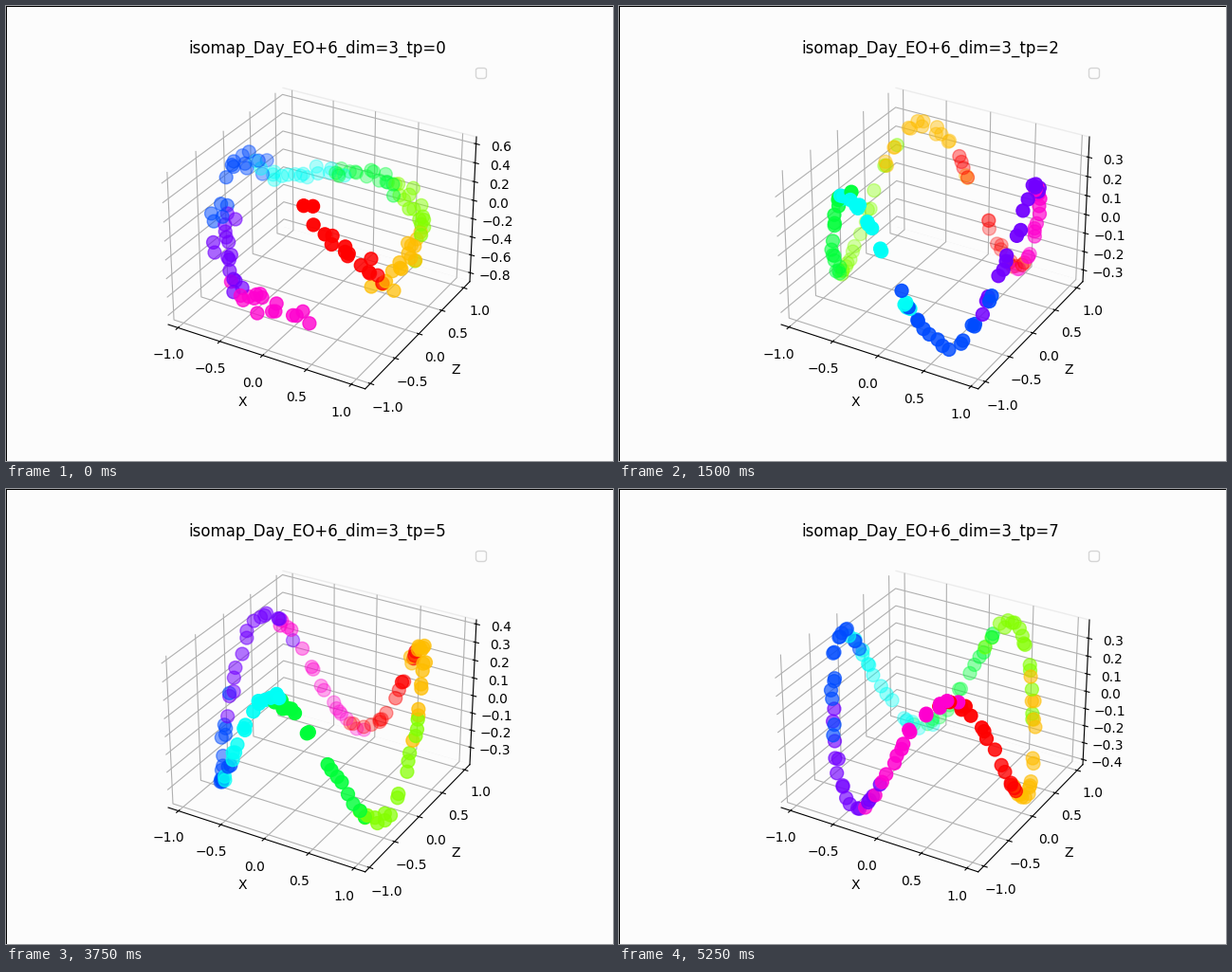
Animation of 640 by 480 pixels, one loop 6000 ms. Source, as a matplotlib script:

```python
from collections import namedtuple

import numpy as np
import matplotlib.pyplot as plt
from matplotlib.animation import FuncAnimation
from matplotlib.patches import Rectangle

W, H = 640, 480
PAPER = "#fcfcfc"
PER_CLASS = 16
HUES = [plt.cm.hsv(i / 8) for i in range(8)]

plt.rcParams["axes.facecolor"] = PAPER

# Angles are in degrees as seen by the viewer: 0 right, 90 front, 180 left.
# first: middle of the red class; turn: the way the classes go round;
# peak: a crest of the three-crested wave on the ring.
Scene = namedtuple("Scene", "xlim ylim zlim first turn peak")
SCENES = [
    Scene((-1.118, 1.153), (-1.101, 1.144), (-.899, .673), 75, -1, None),
    Scene((-1.142, 1.155), (-1.101, 1.148), (-.477, .382), 317, 1, 70),
    Scene((-1.090, 1.077), (-1.142, 1.146), (-.364, .404), 310, -1, 24),
    Scene((-1.118, 1.150), (-1.120, 1.140), (-.400, .420), 325, 1, 10),
    Scene((-1.124, 1.143), (-1.121, 1.145), (-.409, .445), 335, 1, 16),
    Scene((-1.122, 1.121), (-1.081, 1.119), (-.402, .423), 315, 1, -6),
    Scene((-1.110, 1.121), (-1.100, 1.125), (-.415, .410), 60, -1, 83),
    Scene((-1.110, 1.121), (-1.110, 1.132), (-.430, .402), 60, -1, 83),
]


def wave(angle, scene):
    """Three even crests that fill the height of the box."""
    lo, hi = scene.zlim
    crest = np.cos(3 * np.radians(angle - scene.peak))
    return (lo + hi) / 2 + 0.42 * (hi - lo) * crest


def fold(angle, red):
    """Uneven ring of the first scene; its red class rises off as a ramp."""
    keys = [10, 58, 75, 100, 127, 153, 190, 210, 225, 245, 320]
    heights = [-.07, -.27, -.42, -.46, -.4, -.3, .02, .35, .3, 0, .08]
    ring = np.interp(angle, keys, heights, period=360)
    return np.where(red, 0.1 + 0.018 * (angle - 68), ring)


def build(tp):
    """Positions and colours of all dots at one time point."""
    scene = SCENES[tp]
    rng = np.random.default_rng(tp)
    hue = np.repeat(np.arange(8), PER_CLASS)
    spread = np.tile(np.linspace(-25, 25, PER_CLASS), 8)
    angle = scene.first + 45 * scene.turn * hue + spread
    angle = angle + rng.normal(0, 3, hue.size)
    if scene.peak is None:
        height, noise = fold(angle, hue == 0), 0.05
    else:
        height, noise = wave(angle, scene), 0.012
    radius = 1 + rng.normal(0, noise, hue.size)
    height = height + rng.normal(0, noise, hue.size)
    turned = np.radians(angle - 30)
    return (radius * np.cos(turned), -radius * np.sin(turned), height,
            [HUES[k] for k in hue])


def ticks(limits, step):
    """Multiples of step, leaving out the outer 2% of the axis."""
    lo, hi = limits
    pad = 0.02 * (hi - lo)
    first, last = np.ceil((lo + pad) / step), np.floor((hi - pad) / step)
    return np.arange(first, last + 1) * step


clouds = [build(tp) for tp in range(len(SCENES))]

fig = plt.figure(figsize=(W / 100, H / 100), dpi=100, facecolor=PAPER)
ax = fig.add_subplot(projection="3d")
for axis in (ax.xaxis, ax.yaxis, ax.zaxis):
    axis.set_pane_color(PAPER)
ax.yaxis.pane.set_edgecolor("#ececec")
ax.set_xlabel("X")
ax.set_ylabel("Z")
ax.legend(handles=[], loc="upper right")

# Thin black lines along the top and left edges of the stage.
for box in ((0, 1 - 1 / H, 1, 1 / H), (0, 0, 1 / W, 1)):
    fig.add_artist(Rectangle(box[:2], *box[2:], color="black", lw=0))


def draw(tp):
    scene = SCENES[tp]
    for old in list(ax.collections):
        old.remove()
    x, y, z, colours = clouds[tp]
    dots = ax.scatter(x, y, z, c=colours, s=100)

    lo, hi = scene.zlim
    ax.set_xticks(ticks(scene.xlim, 0.5))
    ax.set_yticks(ticks(scene.ylim, 0.5))
    ax.set_zticks(ticks(scene.zlim, 0.2 if hi - lo > 0.84 else 0.1))
    ax.set_xlim(scene.xlim)
    ax.set_ylim(scene.ylim)
    ax.set_zlim(scene.zlim)
    ax.set_title(f"isomap_Day_EO+6_dim=3_tp={tp}")
    return (dots,)


anim = FuncAnimation(fig, draw, frames=len(SCENES), interval=750, repeat=True,
                     repeat_delay=0, blit=False)
plt.show()
```
